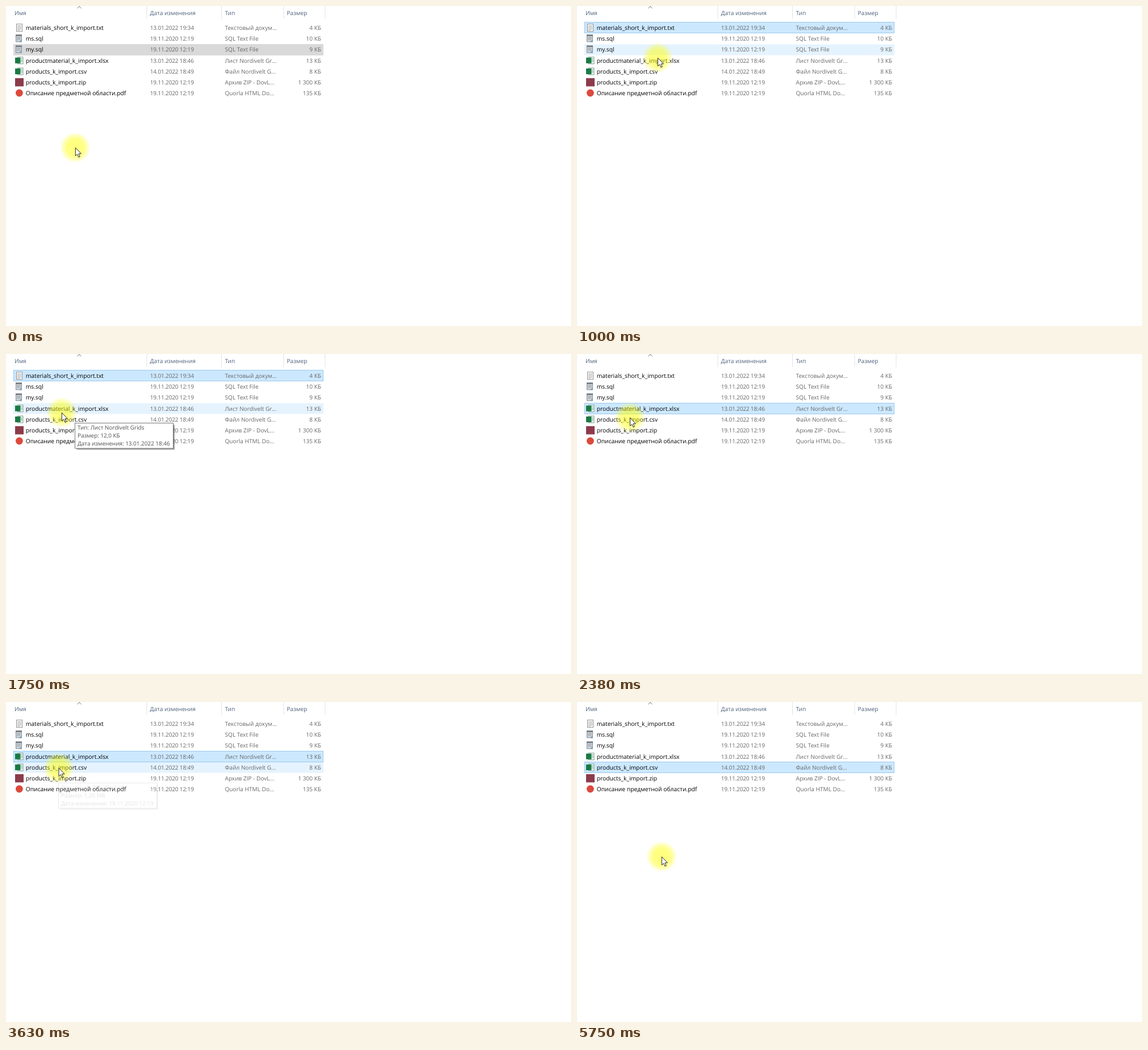
An HTML page that plays this animation: 995 by 563 pixels, repeating every 5.87 s.

```html
<!DOCTYPE html>
<html lang="ru">
<head>
<meta charset="utf-8">
<title>Список файлов</title>
<style>
  html, body { margin: 0; width: 100%; height: 100%; overflow: hidden; background: #fff; }
  svg { display: block; width: 995px; height: 563px; }
  text { font: 10.3px "Open Sans", "Noto Sans", sans-serif; text-rendering: geometricPrecision; white-space: pre; }
  .head { font-size: 10.1px; fill: #4c607a; }
  .name { fill: #000; }
  .info { font-size: 10.1px; fill: #686868; }
  .date { letter-spacing: -.18px; }
  .size { text-anchor: end; }
  .tip { font-size: 10px; letter-spacing: -.04px; fill: #505050; }
</style>
</head>
<body>
<svg id="stage" viewBox="0 0 995 563">
  <defs>
    <radialGradient id="halo">
      <stop offset="0" stop-color="#ff0" stop-opacity=".52"/>
      <stop offset=".55" stop-color="#ff0" stop-opacity=".48"/>
      <stop offset=".8" stop-color="#ff0" stop-opacity=".25"/>
      <stop offset="1" stop-color="#ff0" stop-opacity="0"/>
    </radialGradient>
  </defs>
</svg>
<script>
const LOOP = 5870, TICK = 125, TOP = 28.3, PITCH = 19.2;

const FILES = [
  ['txt', 'materials_short_k_import.txt', '13.01.2022 19:34', 'Текстовый докум...', '4 КБ'],
  ['sql', 'ms.sql', '19.11.2020 12:19', 'SQL Text File', '10 КБ'],
  ['sql', 'my.sql', '19.11.2020 12:19', 'SQL Text File', '9 КБ'],
  ['sheet', 'productmaterial_k_import.xlsx', '13.01.2022 18:46', 'Лист Nordivelt Gr...', '13 КБ'],
  ['sheet', 'products_k_import.csv', '14.01.2022 18:49', 'Файл Nordivelt G...', '8 КБ'],
  ['zip', 'products_k_import.zip', '19.11.2020 12:19', 'Архив ZIP - DovL...', '1 300 КБ'],
  ['page', 'Описание предметной области.pdf', '19.11.2020 12:19', 'Quorla HTML Do...', '135 КБ']
];

const TIPS = [
  { x: 121, y: 121, from: 14, fade: 18,
    rows: ['Тип: Лист Nordivelt Grids', 'Размер: 12,0 КБ', 'Дата изменения: 13.01.2022 18:46'] },
  { x: 92, y: 142, from: 22, fade: 29,
    rows: ['Тип: Архив ZIP - DovLUM', 'Размер: 1,26 МБ', 'Дата изменения: 19.11.2020 12:19'] }
];

// Pointer key points: tick, x, y
const PATH = [
  [0, 122, 249], [3, 100, 44], [6, 116, 62], [8, 142, 91], [11, 126, 168],
  [13, 110, 104], [14, 98, 103], [18, 94, 100], [22, 92, 127], [25, 92, 127],
  [27, 87, 115], [35, 100, 117], [37, 157, 131], [41, 149, 272]
];
// Clicks: tick, row
const CLICKS = [[0, 2], [5, 0], [18, 3], [30, 4]];

const stage = document.getElementById('stage');

function add(parent, tag, attrs, content) {
  const el = document.createElementNS('http://www.w3.org/2000/svg', tag);
  for (const key in attrs) el.setAttribute(key, attrs[key]);
  if (content) el.textContent = content;
  return parent.appendChild(el);
}
const rect = (parent, x, y, width, height, fill, stroke = 'none') =>
  add(parent, 'rect', { x, y, width, height, fill, stroke });
const label = (parent, x, y, cls, content) =>
  add(parent, 'text', { x, y, class: cls }, content);
const line = (parent, d, stroke) =>
  add(parent, 'path', { d, stroke, fill: 'none' });

// Icons are drawn around the row's vertical centre.
const ICONS = {
  txt(g) {
    rect(g, 18.5, -6.5, 10, 13, '#fcfcfc', '#929292');
    line(g, 'M20 -3.5h7M20 -1.5h7M20 .5h7M20 2.5h7M20 4.5h5', '#b0b0b0');
  },
  sql(g) {
    rect(g, 17.5, -6.5, 10, 12, '#cfd4d8', '#858c92');
    rect(g, 17, -7, 11, 2.5, '#6f7982');
    line(g, 'M19 -2.5h7M19 -.5h7M19 1.5h6', '#9aa1a6');
    add(g, 'path', { d: 'M23 6l5 -6v6z', fill: '#7fa3bd' });
  },
  sheet(g) {
    rect(g, 20.5, -6, 9.5, 12, '#fff', '#7d9a88');
    line(g, 'M26 -3h3M26 -.5h3M26 2h3', '#6aa583');
    rect(g, 16, -5, 9.5, 10, '#1a7a45');
  },
  zip: g => rect(g, 16, -7.2, 15, 14.4, '#8d3b4b'),
  page: g => add(g, 'circle', { cx: 23.4, cy: -.4, r: 6.4, fill: '#db4a3c' })
};

function buildTip({ x, y, rows }) {
  const g = add(stage, 'g', { transform: `translate(${x} ${y})` });
  rect(g, 4, 4, 172.5, 44, '#000').setAttribute('opacity', '.18');
  rect(g, 3, 3, 172.3, 43.5, '#000').setAttribute('opacity', '.3');
  rect(g, .5, .5, 173, 44.5, '#fff', '#767676');
  rows.forEach((s, i) => label(g, 5, 12.4 + 13.6 * i, 'tip', s));
  return g;
}

function build() {
  line(stage, 'M248 0V23M379.5 0V23M489 0V23M562 0V23', '#e3e3e3');
  line(stage, 'M125.5 4L129 .7L132.5 4', '#6b6b6b');
  label(stage, 15, 15.7, 'head', 'Имя');
  label(stage, 253.5, 15.7, 'head', 'Дата изменения');
  label(stage, 385.5, 15.7, 'head', 'Тип');
  label(stage, 494.5, 15.7, 'head', 'Размер');

  const hoverBar = rect(stage, 13, 0, 546, 19, '#e5f3ff');
  const pickBar = rect(stage, 13.5, 0, 545, 19, '#cce8ff');

  FILES.forEach(([icon, name, date, type, size], i) => {
    const mid = 38.2 + PITCH * i, base = mid + 3.7;
    ICONS[icon](add(stage, 'g', { transform: `translate(0 ${mid})` }));
    label(stage, 34.7, base, 'name', name);
    label(stage, 253.7, base, 'info date', date);
    label(stage, 385.5, base, 'info', type);
    label(stage, 555, base, 'info size', size);
  });

  const tips = TIPS.map(buildTip);
  const pointer = add(stage, 'g', {});
  add(pointer, 'circle', { r: 27, fill: 'url(#halo)' });
  add(pointer, 'path', {
    d: 'M.3 .3V14.8L3.6 11.8L5.9 17L8.2 16L5.9 10.9H10.4Z',
    fill: '#fff', stroke: '#1c1c1c', 'stroke-width': .95, 'stroke-linejoin': 'round'
  });
  return { hoverBar, pickBar, tips, pointer };
}

const { hoverBar, pickBar, tips, pointer } = build();

const lastBefore = (list, tick) => list.findLast(item => item[0] <= tick);

// Each leg of the path eases out into its end point.
function pointerAt(tick) {
  const [t0, x0, y0] = lastBefore(PATH, tick);
  const [t1, x1, y1] = PATH.find(p => p[0] > tick) || PATH.at(-1);
  const p = t1 > t0 ? (tick - t0) / (t1 - t0) : 1;
  const e = 1 - (1 - p) ** 2;
  return [x0 + (x1 - x0) * e, y0 + (y1 - y0) * e];
}

function heldTick(now) {
  const tick = Math.floor(now / TICK);
  return tick % 8 % 3 === 1 ? tick - 1 : tick;
}

function tipOpacity({ from, fade }, tick) {
  if (tick < from || tick > fade) return 0;
  return tick < fade ? 1 : .15;
}

function draw() {
  const tick = heldTick(performance.now() % LOOP);
  const [x, y] = pointerAt(tick);
  pointer.setAttribute('transform', `translate(${x} ${y})`);

  // Row highlighting trails the pointer by one tick.
  const hovered = Math.floor((pointerAt(Math.max(0, tick - 1))[1] - TOP) / PITCH);
  const picked = lastBefore(CLICKS, tick)[1];
  const focused = tick >= CLICKS[1][0];
  const rowTop = row => Math.round(TOP + PITCH * row);

  hoverBar.setAttribute('y', rowTop(hovered) + .5);
  hoverBar.setAttribute('opacity', FILES[hovered] ? 1 : 0);
  pickBar.setAttribute('y', rowTop(picked) + .5);
  pickBar.setAttribute('fill', focused ? '#cce8ff' : '#d9d9d9');
  pickBar.setAttribute('stroke', focused ? '#99c9ef' : '#d9d9d9');
  tips.forEach((g, i) => g.setAttribute('opacity', tipOpacity(TIPS[i], tick)));
  requestAnimationFrame(draw);
}
draw();
</script>
</body>
</html>
```
